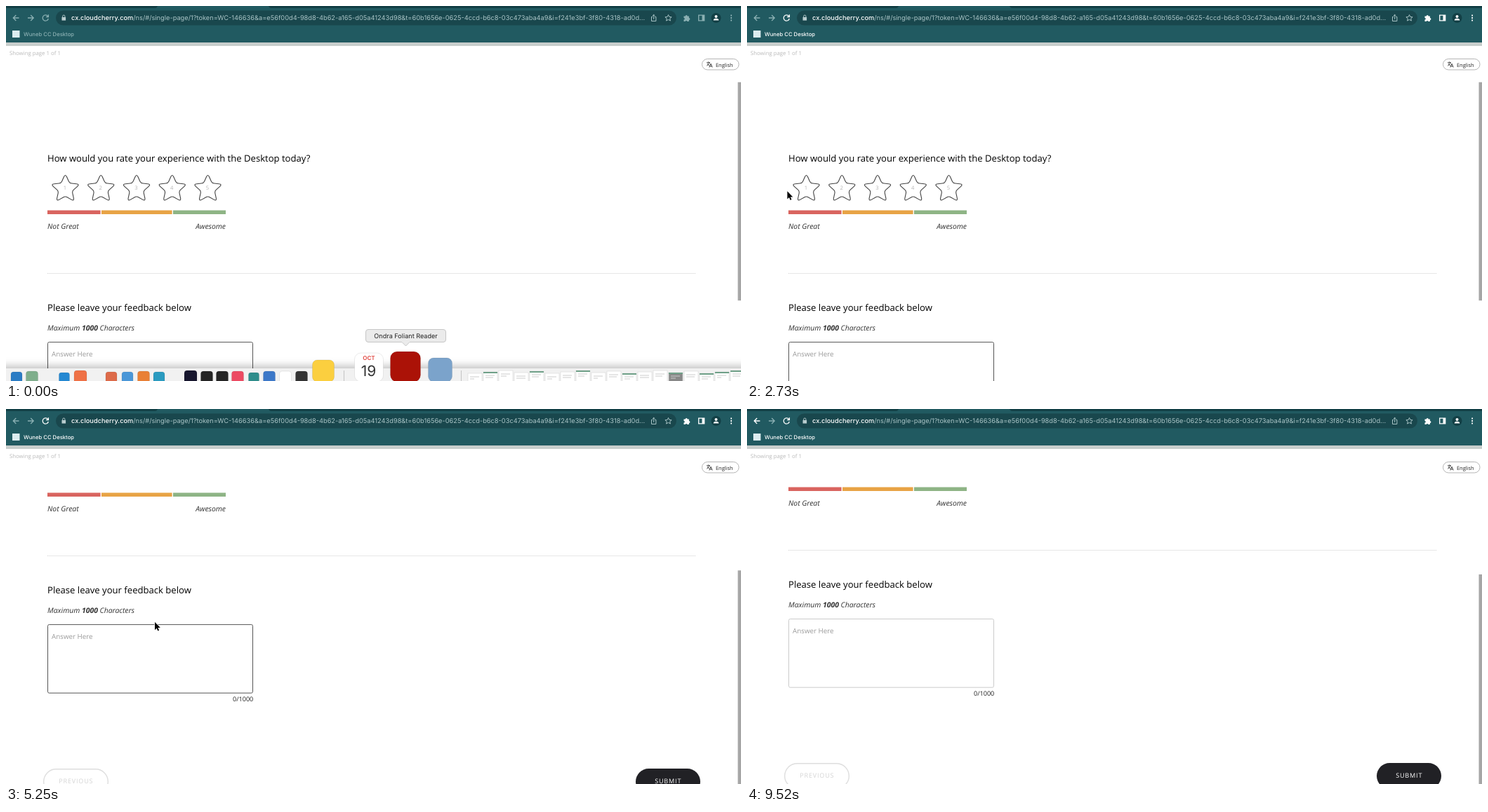
Recreate the animation shown at these times as an HTML page. Size 1047 by 535 pixels, loop 9.73 s.

```html
<!DOCTYPE html>
<html lang="en">
<head>
<meta charset="utf-8">
<title>Feedback survey</title>
<style>
  html, body { margin: 0; width: 100%; height: 100%; overflow: hidden; background: #fff; }
  svg { display: block; }
  text { white-space: pre; text-rendering: geometricPrecision; }
  .ui { font-family: Inter, Roboto, sans-serif; }
  .page { font-family: "Open Sans", "Noto Sans", sans-serif; }
  .head { font-size: 13.1px; fill: #000; }
  .note { font-size: 10.4px; font-style: italic; fill: #333; }
  .btn { font-size: 9.1px; letter-spacing: .8px; text-anchor: middle; }
  .line { fill: none; stroke: currentColor; stroke-width: 1.3; }
  .dim { color: #8bb0b3; }
  .lit { color: #fff; }
</style>
</head>
<body>
<svg width="1047" height="535" viewBox="0 0 1047 535">
  <defs><clipPath id="view"><path d="M0 108H1047V535H0Z"/></clipPath></defs>

  <g class="page" clip-path="url(#view)">
    <g id="content">
      <text class="head" x="59" y="221.5">How would you rate your experience with the Desktop today?</text>
      <g id="stars"></g>
      <path fill="#d9645f" d="M59 291.6h75.6v5.4H59z"/>
      <path fill="#e8a345" d="M136 291.6h100.6v5.4H136z"/>
      <path fill="#8eb485" d="M238 291.6h75v5.4h-75z"/>
      <text class="note" x="59" y="318">Not Great</text>
      <text class="note" x="313" y="318" text-anchor="end">Awesome</text>
      <path d="M59 381.5H983" stroke="#cfcfcf" stroke-dasharray="1 1"/>
      <text class="head" x="59" y="434.8">Please leave your feedback below</text>
      <text class="note" x="59" y="463">Maximum <tspan font-weight="700">1000</tspan> Characters</text>
      <rect id="box" x="59.5" y="479.6" width="292" height="97.6" rx="2" fill="#fff"/>
      <text x="65" y="500" font-size="9.8" fill="#9a9a9a">Answer Here</text>
      <path id="caret" d="M65 489h1v14h-1z"/>
      <text x="352.3" y="588.5" font-size="9.1" fill="#222" text-anchor="end">0/1000</text>
      <rect x="53.7" y="685.7" width="91.6" height="35.6" rx="17.8" fill="#fff" stroke="#dedede" stroke-width="1.4"/>
      <text class="btn" x="99.8" y="706.3" fill="#d4d4d4">PREVIOUS</text>
      <rect id="submit" x="897" y="685" width="92" height="37" rx="18.5"/>
      <text class="btn" x="943.2" y="706.3" fill="#fff">SUBMIT</text>
    </g>
  </g>
  <rect id="thumb" x="1042.5" width="5" height="311.5" fill="#a6a6a6"/>

  <g class="page">
    <text x="5" y="69.8" font-size="7.8" fill="#b9b9b9">Showing page 1 of 1</text>
    <rect x="991.5" y="75.5" width="52.5" height="15.5" rx="7.75" fill="#fff" stroke="#b5b5b5"/>
    <path d="M998 80.7h5M1000.5 79.5v1.2M1002.2 80.7q-1 3-4 4.6M999 82q1 2 2.8 3M1001.8 87.5l2.2-5.2 2.2 5.2M1002.6 86h2.8" fill="none" stroke="#333" stroke-width=".9"/>
    <text x="1011" y="86.5" font-size="7.4" fill="#222">English</text>
  </g>

  <g class="ui">
    <path fill="#215a61" d="M0 0H1047V52H0Z"/>
    <path fill="#123f45" d="M0 0H216Q215 3 212 3H0ZM374 0H1047V3H378Q375 3 374 0Z"/>
    <path fill="#c8cecc" d="M0 52H1047V57H0Z"/>
    <rect x="71" y="6.5" width="884" height="21" rx="10.5" fill="#19474d"/>
    <path id="back" class="line" d="M18.5 17H10.5M14.3 13l-4 4 4 4"/>
    <path class="line dim" d="M31 17h8M35.2 13l4 4-4 4"/>
    <g class="live">
      <path class="line" d="M59.6 14.6a4.1 4.1 0 1 0 .7 3.4M60.4 12.3v3.2h-3.2"/>
      <path fill="currentColor" d="M965.5 14.5h2.2a1.5 1.5 0 1 1 3 0h2.2v2.5a1.5 1.5 0 1 1 0 3v2h-2.6a1.4 1.4 0 0 0-2.6 0h-2.2v-2.5a1.3 1.3 0 0 0 0-2.6Z"/>
      <path class="line" d="M986.7 13.2h8v7.6h-8z"/><path fill="currentColor" d="M991.5 13h3.5v8h-3.5z"/>
      <circle cx="1011.5" cy="17" r="7" fill="#123f45"/>
      <circle cx="1011.5" cy="15" r="2" fill="#fff"/><path fill="#fff" d="M1007.7 20.6q0-2.8 3.8-2.8t3.8 2.8z"/>
      <path fill="currentColor" d="M1032.2 12.6h1.8v1.8h-1.8zM1032.2 16.1h1.8v1.8h-1.8zM1032.2 19.6h1.8v1.8h-1.8z"/>
      <text x="25" y="43" font-size="7.7" font-weight="500" fill="currentColor">Wuneb CC Desktop</text>
    </g>
    <path fill="#b9cdcf" d="M79.5 16h5.6v4.6h-5.6z"/>
    <path d="M80.7 16v-1.4a1.6 1.6 0 0 1 3.2 0V16" fill="none" stroke="#b9cdcf"/>
    <text x="93" y="20.2" font-size="9.25" fill="#a9c4c6"><tspan fill="#fff" font-weight="500">cx.cloudcherry.com</tspan>/ns/#/single-page/1?token=WC-146636&amp;a=e56f00d4-98d8-4b62-a165-d05a41243d98&amp;t=60b1656e-0625-4ccd-b6c8-03c473aba4a9&amp;i=f241e3bf-3f80-4318-ad0d...</text>
    <path fill="none" stroke="#a9c4c6" d="M921 15.5h-1.5v6h6.4v-6h-1.5M922.7 19v-6.5M920.8 14.2l1.9-1.9 1.9 1.9"/>
    <path fill="none" stroke="#a9c4c6" d="M943.5 12.5l1.4 3 3.2.3-2.4 2.1.7 3.2-2.9-1.7-2.9 1.7.7-3.2-2.4-2.1 3.2-.3z"/>
    <rect x="9" y="35" width="10.5" height="10" fill="#dcecef"/>
  </g>

  <g id="dock" class="ui">
    <rect x="-20" y="517" width="1087" height="60" fill="#f1f1f1" style="filter:drop-shadow(0 -3px 6px #0004)"/>
    <path stroke="#c4c4c4" d="M481.5 520v20M648.5 520v20"/>
    <g id="windows"></g>
    <g id="icons" stroke="#0002" stroke-width=".6"></g>
    <g id="date" text-anchor="middle">
      <text x="517" y="505" font-size="8" font-weight="600" fill="#e0443e">OCT</text>
      <text x="516.5" y="527.5" font-size="21" fill="#333">19</text>
    </g>
    <g id="tip">
      <path d="M516 461.5H623a3.5 3.5 0 0 1 3.5 3.5V476a3.5 3.5 0 0 1-3.5 3.5H575l-5.5 5.5-5.5-5.5H516a3.5 3.5 0 0 1-3.5-3.5V465a3.5 3.5 0 0 1 3.5-3.5Z" fill="#ebebeb" stroke="#c6c6c6"/>
      <text x="569.5" y="474" font-size="9.1" text-anchor="middle" fill="#222">Ondra Foliant Reader</text>
    </g>
  </g>

  <g id="cursor" stroke-linejoin="round">
    <path id="arrow" d="M0 0V11.2L2.6 8.8 4.3 12.6 6.1 11.8 4.4 8.1H7.9Z" stroke="#fff" stroke-width="1.4" paint-order="stroke"/>
    <g id="hand" stroke="#222" stroke-width=".9">
      <path fill="#fff" d="M-1.3 1.3Q0-.5 1.3 1.3V5.6Q2.6 4.8 3.6 6 5 5.4 5.8 6.8 7.4 6.6 7.4 8V10.5Q7.2 13 6 14.8H-.2Q-2.2 12-3.8 9.4-3.6 7.6-1.3 9.6Z"/>
      <path d="M1.3 10v3M3.2 10v3M5 10v3"/>
    </g>
    <path id="beam" d="M-2-6Q0-6 0-5 0-6 2-6M0-5V5M-2 6Q0 6 0 5 0 6 2 6" fill="none" stroke="#333"/>
  </g>
</svg>

<script>
const LOOP = 9730, STEP = 70, ACTIVE = 2100, FOCUS = 5530;
const $ = id => document.getElementById(id);
const set = (el, attrs) => { for (const k in attrs) el.setAttribute(k, attrs[k]); return el; };
const add = (parent, tag, attrs) =>
  parent.appendChild(set(document.createElementNS("http://www.w3.org/2000/svg", tag), attrs));
const show = (el, on) => el.setAttribute("visibility", on ? "visible" : "hidden");
const ramp = (t, a, b) => Math.min(1, Math.max(0, (t - a) / (b - a)));
const smooth = p => p * p * (3 - 2 * p);
const cubic = p => p < .5 ? 4 * p ** 3 : 1 - 4 * (1 - p) ** 3;
const mix = (a, b, p) => a + (b - a) * p;

// Five-pointed star with rounded tips and notches
function starPath(cx, cy) {
  const corner = i => {
    const r = i % 2 ? 10.2 : 21.8, a = i * Math.PI / 5;
    return [cx + r * Math.sin(a), cy - r * Math.cos(a)];
  };
  const toward = (a, b, p) => a.map((v, k) => mix(v, b[k], p));
  let d = "";
  for (let i = 0; i < 10; i++) {
    const c = corner(i), cut = i % 2 ? .2 : .34;
    d += `${i ? "L" : "M"}${toward(c, corner(i + 9), cut)}Q${c} ${toward(c, corner(i + 1), cut)}`;
  }
  return d + "Z";
}
for (let i = 0; i < 5; i++) {
  const x = 84.5 + i * 50.75;
  add($("stars"), "path", { d: starPath(x, 261), fill: "#fff", stroke: "#444", "stroke-width": 1.1 });
  add($("stars"), "text", { x: x - .5, y: 262.4, "font-size": 7.6, fill: "#b4b4b4", "text-anchor": "middle" }).textContent = i + 1;
}

// Dock icons: centre, size, colour
const icons = [
  [15, 16, "#2b7cc4"], [37, 17, "#7fae8c"], [83, 15, "#2488d2"], [106, 18, "#ef7146"],
  [150, 16, "#dd6b4a"], [173, 16, "#4a97d8"], [196, 17, "#e98036"], [218, 16, "#2b9bc0"],
  [263, 18, "#17162e"], [286, 17, "#252525"], [308, 17, "#252525"], [330, 17, "#ec4a62"],
  [353, 15, "#2f8d8b"], [375, 17, "#3c78c8"], [398, 17, "#fff"], [421, 17, "#333"],
  [452, 31, "#fbcf3f"], [517, 41, "#fff"], [569, 43, "#ab1207"], [618.5, 34, "#7ba3cb"]
].map(([x, size, fill]) => ({ x, size, el: add($("icons"), "rect", { fill }) }));

for (let i = 0; i < 18; i++) {
  const x = 658 + i * 22, h = 10 + i * 7 % 5;
  add($("windows"), "rect", { x, y: 534 - h, width: 20, height: 16, fill: i == 13 ? "#888" : "#fff", stroke: "#d5d5d5", "stroke-width": .6 });
  if (i % 3 == 1 || i > 14) add($("windows"), "rect", { x, y: 534 - h, width: 20, height: 2, fill: "#6fa088" });
  add($("windows"), "path", { d: `M${x + 3} ${539 - h}h13M${x + 3} ${542 - h}h${6 + i * 5 % 8}`, stroke: "#ccc" });
}

// Pointer: time, x, y, shape from then on
const track = [
  [0, 569, 540, "arrow"], [210, 555, 520, "arrow"], [840, 84, 268, "hand"], [980, 81, 262, "hand"],
  [1050, 81, 261, "hand"], [1330, 81, 261, "hand"], [1400, 74.5, 262, "arrow"], [1540, 39, 287, "arrow"],
  [1610, 47, 268, "arrow"], [1680, 47, 268, "arrow"], [1820, 19, 291, "arrow"], [1890, 19, 291, "arrow"],
  [2380, 36, 270, "arrow"], [2870, 66, 262, "hand"], [3220, 136, 252, "hand"], [3570, 275, 261, "hand"],
  [3640, 306, 265, "arrow"], [3850, 370, 271, "arrow"], [4200, 407, 279, "arrow"], [5040, 407, 279, "arrow"],
  [5250, 212, 304, "arrow"], [5320, 196, 322, "beam"], [5530, 176, 334, "beam"], [5950, 168, 336, "beam"],
  [6090, 168, 336, "beam"], [6300, 352, 335, "arrow"], [6580, 621, 330, "arrow"], [7070, 621, 330, "arrow"],
  [7840, 910, 508, "hand"], [8050, 928, 516, "hand"], [8120, 931, 516, "hand"], [8400, 931, 516, "hand"],
  [9100, 940, 542, "arrow"], [LOOP, 940, 542, "arrow"]
];
const blinks = [[FOCUS, 5950], [6160, 6580], [7140, 7560], [8050, 8540], [9030, 9520]];

function drawDock(t) {
  const shrink = smooth(ramp(t, 70, 350));
  set($("dock"), { transform: `translate(0 ${50 * smooth(ramp(t, 280, 910))})` });
  show($("dock"), t < 980);
  for (const { x, size, el } of icons) {
    const s = mix(size, Math.min(size, 17), shrink), base = mix(size > 20 ? 536 : 538, 538, shrink);
    set(el, { x: x - s / 2, y: base - s, width: s, height: s, rx: s * .22 });
  }
  const k = mix(1, .42, shrink);
  set($("date"), { transform: `translate(517 536) scale(${k}) translate(-517 -536)` });
  set($("tip"), { opacity: t < 140 ? 1 : 0 });
}

function drawCursor(t) {
  const i = track.findIndex((k, n) => t < track[n + 1][0]);
  const [t0, x0, y0, shape] = track[i], [t1, x1, y1] = track[i + 1];
  const p = ramp(t, t0, t1);
  set($("cursor"), { transform: `translate(${mix(x0, x1, p)} ${mix(y0, y1, p)})` });
  for (const id of ["arrow", "hand", "beam"]) show($(id), id == shape);
}

function draw(now) {
  const t = Math.floor(now % LOOP / STEP) * STEP;
  const scroll = 172 * cubic(ramp(t, 4410, 4970)) + 8 * smooth(ramp(t, 6650, 6930));
  set($("content"), { transform: `translate(0 ${-scroll})` });
  set($("thumb"), { y: 108.7 + scroll * .707 });
  set($("box"), { stroke: t < FOCUS ? "#555" : "#cbcbcb" });
  show($("caret"), blinks.some(([a, b]) => t >= a && t < b));
  set($("submit"), { fill: t >= 7840 && t < 9030 ? "#36363b" : "#212125" });
  set($("back"), { class: "line " + (t < FOCUS ? "dim" : "lit") });
  set(document.querySelector(".live"), { class: "live " + (t < ACTIVE ? "dim" : "lit") });
  drawDock(t);
  drawCursor(t);
  requestAnimationFrame(draw);
}
draw(0);
</script>
</body>
</html>
```
